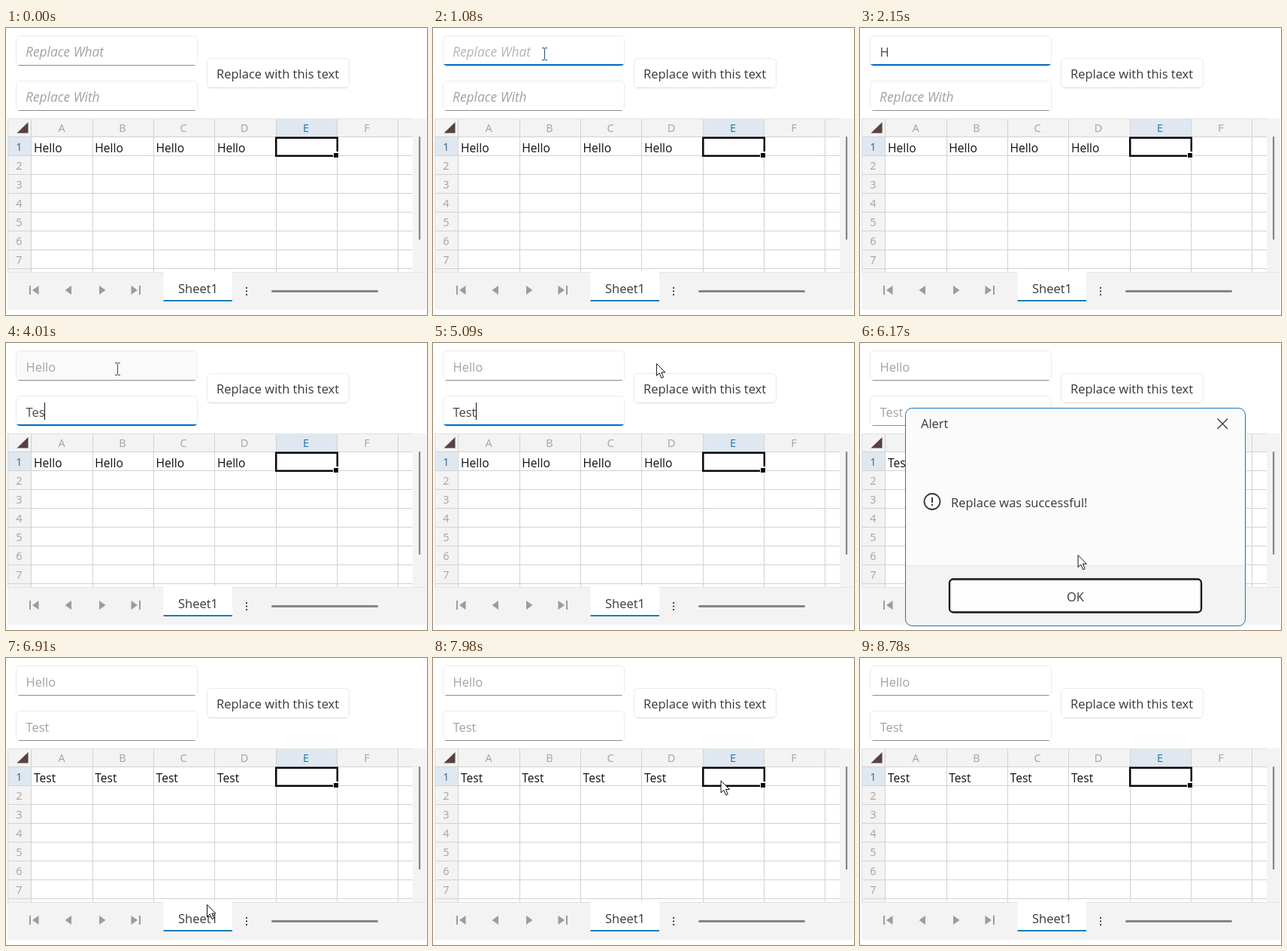
Animation, 560 px wide and 381 px high, one loop 8.85 s. Source, as an HTML page with a canvas:

```html
<!DOCTYPE html>
<html lang="en">
<head>
<meta charset="utf-8">
<title>Find and replace in a spreadsheet</title>
<style>
html, body { margin: 0; width: 100%; height: 100%; overflow: hidden; background: #fff; }
canvas { display: block; width: 560px; height: 381px; }
</style>
</head>
<body>
<canvas id="stage" width="560" height="381"></canvas>
<script>
const W = 560, H = 381, LOOP = 8850;
const FAMILY = '"Open Sans", "Noto Sans", sans-serif';
const GRAY = '#a2a2a2', DARK = '#38383c', BLUE = '#0067c0', BAR = '#f3f3f3', LINE = '#d2d2d2';

const screen = document.getElementById('stage').getContext('2d');
const layer = new OffscreenCanvas(W, H).getContext('2d');
let ctx = screen;

// Times of the main actions
const ENTER = 130, LEAVE = 8780, REPLACE = 5430, PRESS = 6650, CLOSE = 6800;

const FIELDS = [
  { y: 10, hint: 'Replace What', word: 'Hello', focus: 1080, blur: 2740, type: 2150, pace: 110 },
  { y: 70, hint: 'Replace With', word: 'Test', focus: 2740, blur: REPLACE, type: 3680, pace: 160 }
];

// Each move bends the pointer's way towards a control point
const HOME = { x: 492, y: 342 };
const MOVES = [
  { start: 130, end: 470, via: { x: 310, y: 180 }, to: { x: 142, y: 56 } },
  { start: 740, end: 800, via: { x: 145, y: 45 }, to: { x: 148, y: 34 } },
  { start: 4600, end: 5230, via: { x: 240, y: -45 }, to: { x: 341, y: 67 } },
  { start: 5900, end: 6300, via: { x: 301, y: 284 }, to: { x: 267, y: 327 } },
  { start: 7250, end: 7780, via: { x: -132, y: 255 }, to: { x: 285, y: 186 } },
  { start: 7930, end: 8250, via: { x: 640, y: 110 }, to: { x: 380, y: 58 } }
];

const between = (t, a, b) => t >= a && t < b;
const ramp = (t, a, b) => Math.min(1, Math.max(0, (t - a) / (b - a)));
const bend = (a, b, c, u) => (1 - u) ** 2 * a + 2 * u * (1 - u) * b + u * u * c;

function pointerAt(t) {
  if (!between(t, ENTER, LEAVE)) return null;
  let p = HOME;
  for (const { start, end, via, to } of MOVES) {
    const u = ramp(t, start, end);
    p = { x: bend(p.x, via.x, to.x, u), y: bend(p.y, via.y, to.y, u) };
  }
  return p;
}

const inside = (p, x, y, w, h) => !!p && p.x >= x && p.x < x + w && p.y >= y && p.y < y + h;
const overField = (p, f) => inside(p, 13, f.y, 242, 40);

function fill(x, y, w, h, color) {
  ctx.fillStyle = color;
  ctx.fillRect(x, y, w, h);
}

function box(x, y, w, h, r, bg, border, width = 1) {
  ctx.beginPath();
  ctx.roundRect(x, y, w, h, r);
  if (bg) { ctx.fillStyle = bg; ctx.fill(); }
  if (border) { ctx.strokeStyle = border; ctx.lineWidth = width; ctx.stroke(); }
}

function clipped(x, y, w, h, r, paint) {
  ctx.save();
  ctx.beginPath();
  ctx.roundRect(x, y, w, h, r);
  ctx.clip();
  paint();
  ctx.restore();
}

function label(s, x, y, color = DARK, size = 16.5, align = 'left', style = '') {
  ctx.font = `${style} ${size}px ${FAMILY}`;
  ctx.textAlign = align;
  ctx.fillStyle = color;
  ctx.fillText(s, x, y);
}

function shape(points, color) {
  ctx.beginPath();
  points.forEach(([x, y]) => ctx.lineTo(x, y));
  ctx.closePath();
  ctx.fillStyle = color;
  ctx.fill();
}

function field(f, t, p) {
  const { y, hint, word } = f;
  const focus = between(t, f.focus, f.blur);
  const hover = overField(p, f) && !focus;
  clipped(13, y, 242, 40, 5, () => {
    fill(13, y, 242, 40, hover ? '#fafafa' : '#fff');
    box(13.5, y + .5, 241, 44, 5, null, '#ebebeb');
    if (focus) fill(13, y + 38, 242, 2, BLUE);
    else fill(13, y + 39, 242, 1, '#8c8c8c');
  });

  const typed = Math.max(0, Math.floor((t - f.type) / f.pace) + 1);
  const text = word.slice(0, typed);
  if (text) label(text, 26.5, y + 28, focus ? '#4a4640' : GRAY);
  else label(hint, 26, y + 28, hover ? '#959595' : focus ? '#b4b4b4' : GRAY, 17.4, 'left', 'italic');

  const blink = t - f.focus - 200;
  if (focus && blink >= 0 && blink % 1060 < 530) {
    ctx.font = `16.5px ${FAMILY}`;
    fill(Math.round(26 + ctx.measureText(text).width), y + 9, 1, 23, '#111');
  }
}

function button(p) {
  const hover = inside(p, 267, 41, 190, 39);
  box(267.5, 40.5, 189, 39, 5, hover ? '#fafafa' : '#fff', '#eaeaea');
  fill(271, 79, 182, 1, '#dadada');
  label('Replace with this text', 280, 67, hover ? '#2a2a3a' : DARK);
}

function sheet(t) {
  const colX = i => Math.floor(34 + i * 81.25);
  const rowY = i => 145 + 25 * i;
  fill(2, 120, 557, 254, BAR);
  fill(34, 145, 507, 180, '#fff');
  fill(359, 120, 82, 25, '#dfe8f1');
  fill(3, 145, 31, 25, '#dfe8f1');
  shape([[29.5, 125], [29.5, 139.5], [14.5, 139.5]], '#574141');

  for (let i = 0; i < 7; i++) {
    const active = i === 4;
    fill(colX(i) - (i ? 0 : 1), 120, 1, 205, LINE);
    if (i < 6) label('ABCDEF'[i], colX(i) + 40, 138, active ? '#2370a8' : GRAY, 14.5, 'center');
  }
  for (let i = 0; i < 8; i++) {
    fill(3, rowY(i) - 1, 538, 1, LINE);
    if (i < 7) label(i + 1, 17.5, rowY(i) + 18, i ? GRAY : '#3f5f80', 14.5, 'center');
  }
  fill(2, 120, 1, 205, '#dedede');
  fill(3, 120, 538, 1, '#e2e2e2');

  const value = t < REPLACE ? 'Hello' : 'Test';
  for (let i = 0; i < 4; i++) label(value, 37 + i * 81.3, 165, '#101014', 15.6);

  ctx.strokeStyle = '#0b0710';
  ctx.lineWidth = 2.5;
  ctx.strokeRect(359.25, 145.75, 81.5, 24);
  fill(435, 164, 8, 9, '#fff');
  fill(436, 166, 6, 6, '#0b0710');

  box(549, 144, 2.2, 137, 1.1, '#858585');
}

// Small triangle, with an optional stop bar on its tip side
function navIcon(x, dir, stop) {
  shape([[x - 4.5 * dir, 342], [x - 4.5 * dir, 354], [x + 4 * dir, 348]], '#9c9c9c');
  if (stop) fill(x + 7 * dir - 1, 342, 2, 12, '#9c9c9c');
}

function footer() {
  fill(2, 324, 557, 50, BAR);
  fill(2, 324, 557, 1, '#e4e4e4');
  navIcon(39, -1, true);
  navIcon(82.5, -1);
  navIcon(128.5, 1);
  navIcon(171, 1, true);
  fill(209.5, 323, 91.5, 40, '#fff');
  fill(209.5, 361, 91.5, 2, '#1a7cbc');
  label('Sheet1', 229, 352);
  for (let i = 0; i < 3; i++) fill(319, 344 + 4.5 * i, 2, 2, '#444');
  box(353, 348, 142, 3, 1.5, '#858585');
}

function dialog(t, p) {
  clipped(60, 86, 453, 290, 9, () => {
    fill(60, 86, 453, 209, '#fbfbfb');
    fill(60, 295, 453, 81, BAR);
    fill(60, 295, 453, 1, '#e6e6e6');
  });
  box(60.5, 86.5, 452, 289, 9, null, '#1478c8');

  label('Alert', 81, 113);
  ctx.strokeStyle = DARK;
  ctx.lineWidth = 1.3;
  ctx.beginPath();
  ctx.moveTo(475.5, 100.5);
  ctx.lineTo(489, 114);
  ctx.moveTo(489, 100.5);
  ctx.lineTo(475.5, 114);
  ctx.stroke();

  ctx.lineWidth = 1.8;
  ctx.beginPath();
  ctx.arc(96, 210.5, 10.5, 0, Math.PI * 2);
  ctx.stroke();
  fill(95, 205, 2, 7, DARK);
  fill(95, 214, 2, 2, DARK);
  label('Replace was successful!', 121, 218);

  const pressed = between(t, PRESS, CLOSE + 30);
  const hover = inside(p, 121, 315, 331, 41);
  box(119, 313.5, 335, 44, 5, '#fff', '#161616', 2.3);
  box(121.5, 315.5, 330, 40, 3, pressed ? '#f5f5f5' : hover ? '#fafafa' : '#fefefe', '#e6e6e6');
  label('OK', 286.5, 343, pressed ? '#666' : DARK, 16.5, 'center');
}

// The dialog is painted on its own layer so that it fades as one piece
function fadeDialog(t, p) {
  const alpha = ramp(t, 5410, 5630) ** 2 * (1 - ramp(t, CLOSE, CLOSE + 100));
  if (!alpha) return;
  layer.clearRect(0, 0, W, H);
  ctx = layer;
  dialog(t, p);
  ctx = screen;
  ctx.globalAlpha = alpha;
  ctx.drawImage(layer.canvas, 0, 0);
  ctx.globalAlpha = 1;
}

function arrow({ x, y }) {
  ctx.save();
  ctx.translate(x + .5, y + .5);
  shape([[0, 0], [0, 16], [3.8, 12.6], [6.6, 19.2], [9.2, 18], [6.4, 11.6], [11.4, 11.6]], '#fff');
  ctx.strokeStyle = '#111';
  ctx.lineWidth = 1;
  ctx.stroke();
  ctx.restore();
}

function beam({ x, y }) {
  x = Math.round(x);
  y = Math.round(y);
  const color = '#1c4f80';
  fill(x, y - 7, 1, 15, color);
  for (const dy of [-8, 8]) {
    fill(x - 3, y + dy, 3, 1, color);
    fill(x + 1, y + dy, 3, 1, color);
  }
}

function draw(t) {
  const p = pointerAt(t);
  fill(0, 0, W, H, '#fff');
  for (const f of FIELDS) field(f, t, p);
  button(p);
  sheet(t);
  footer();
  fadeDialog(t, p);
  // The pointer hides while typing in the first field
  if (!p || between(t, FIELDS[0].type, FIELDS[0].blur)) return;
  const pointer = FIELDS.some(f => overField(p, f)) ? beam : arrow;
  pointer(p);
}

const begin = performance.now();
function tick() {
  draw((performance.now() - begin) % LOOP);
  requestAnimationFrame(tick);
}
tick();
</script>
</body>
</html>
```
